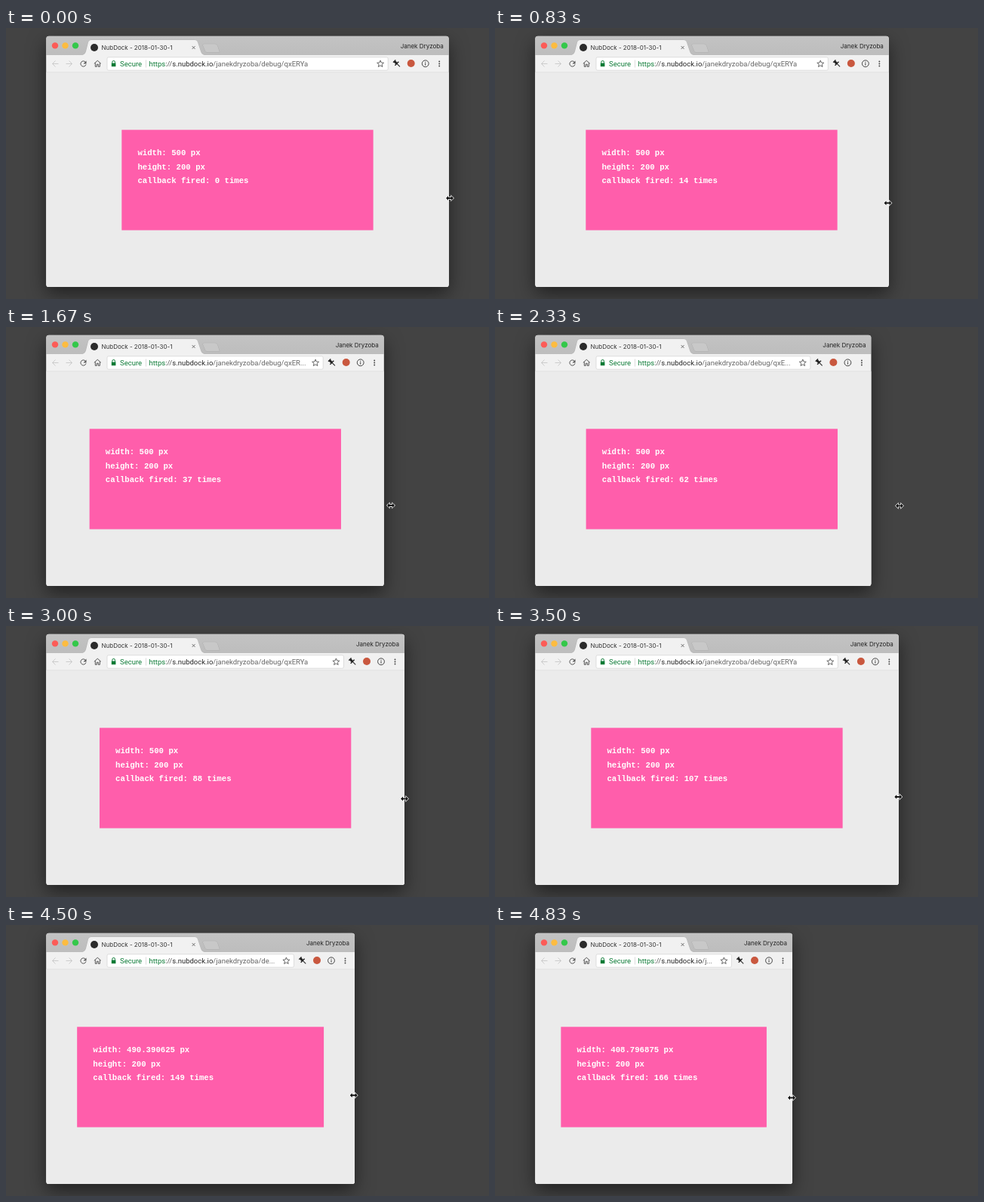
An HTML page with a canvas for the animation above (5000 ms loop, 640 px wide and 360 px high).

```html
<!DOCTYPE html>
<html lang="en">
<head>
<meta charset="utf-8">
<title>Resize observer demo</title>
<style>
html, body { margin: 0; width: 100%; height: 100%; overflow: hidden; background: #434343; }
canvas { display: block; width: 640px; height: 360px; }
</style>
</head>
<body>
<canvas id="stage"></canvas>
<script>
const LOOP = 5000, STEP_RATE = 6, LAST_STEP = 29;
const LEFT = 53.3, TOP = 10.7, BAR_BOTTOM = 36, PAGE_TOP = 59, BOTTOM = 344;
const SCALE = 2 / 3; // stage pixels per page pixel
const SHAKE = 14;    // sideways swing of the drag, in stage pixels
const URL_FONT = '9.5px Roboto, sans-serif';
const UI_FONT = '8px Inter, sans-serif';
const PAGE_FONT = 'bold 10.667px "Liberation Mono", monospace';
const GREEN = '#0b7a35';
const URL_RUNS = [
  ['https', GREEN],
  ['://', '#555'],
  ['s.nubdock.io', '#262626'],
  ['/janekdryzoba/debug/qxERYa', '#666']
];
const ADDRESS = URL_RUNS.map(run => run[0]).join('');

// Main poses of the drag: cursor, window edge, laid-out page width, callback count.
const POSES = [
  { step: 3, x: 588, y: 226, edge: 586.7, page: 800, count: 0 },
  { step: 7, x: 453, y: 239, edge: 457, page: 601, count: 27 },
  { step: 10, x: 510, y: 237, edge: 500.7, page: 672, count: 37 },
  { step: 14, x: 536, y: 237.5, edge: 498.4, page: 702, count: 62 },
  { step: 18, x: 528, y: 229.5, edge: 528, page: 712, count: 88 },
  { step: 25, x: 528.5, y: 223, edge: 530, page: 715, count: 132 },
  { step: 29, x: 393, y: 229.5, edge: 394, page: 511, count: 166 }
];

const canvas = document.getElementById('stage');
const ratio = window.devicePixelRatio || 1;
canvas.width = 640 * ratio;
canvas.height = 360 * ratio;
const ctx = canvas.getContext('2d');
ctx.scale(ratio, ratio);

function poseAt(step) {
  if (step <= POSES[0].step) return POSES[0];
  const next = POSES.findIndex(pose => pose.step >= step);
  const a = POSES[next - 1], b = POSES[next];
  const p = (step - a.step) / (b.step - a.step);
  const eased = p * p * (3 - 2 * p);
  const mix = (key, amount = eased) => a[key] + (b[key] - a[key]) * amount;
  const swing = SHAKE * Math.sin(2 * Math.PI * p);
  return {
    x: mix('x') + swing,
    y: mix('y'),
    edge: mix('edge') + swing,
    page: Math.round(mix('page') + swing / SCALE),
    count: Math.round(mix('count', p))
  };
}

function rect(x, y, w, h, color) {
  ctx.fillStyle = color;
  ctx.fillRect(x, y, w, h);
}

function circle(x, y, r, color) {
  ctx.fillStyle = color;
  ctx.beginPath();
  ctx.arc(x, y, r, 0, Math.PI * 2);
  ctx.fill();
}

function at(x, y, paint) {
  ctx.save();
  ctx.translate(x, y);
  paint();
  ctx.restore();
}

function trace(d, x, y, { fill, stroke, width = 1 }) {
  const path = new Path2D(d);
  at(x, y, () => {
    if (stroke) {
      ctx.strokeStyle = stroke;
      ctx.lineWidth = width;
      ctx.stroke(path);
    }
    if (fill) {
      ctx.fillStyle = fill;
      ctx.fill(path);
    }
  });
}

function text(str, x, y, font, color, align = 'left') {
  ctx.font = font;
  ctx.fillStyle = color;
  ctx.textAlign = align;
  ctx.fillText(str, x, y);
}

function roundRect(x, y, w, h, r) {
  ctx.beginPath();
  ctx.roundRect(x, y, w, h, r);
}

function drawTitleBar(edge) {
  const shade = ctx.createLinearGradient(0, TOP, 0, BAR_BOTTOM);
  shade.addColorStop(0, '#c3c3c3');
  shade.addColorStop(1, '#bdbdbd');
  rect(LEFT, TOP, edge - LEFT, BAR_BOTTOM - TOP, shade);
  ['#fc5b57', '#fdbc40', '#34c84a'].forEach((color, i) => circle(65 + i * 13.5, 23.4, 4.2, color));
  trace('M0 20Q4 19 5 15L8 3Q9 0 12 0H149Q152 0 153 3L157 15Q158 19 162 20Z',
    101, 16, { fill: '#f1f1f1', stroke: '#a9a9a9', width: 0.6 });
  trace('M1 0H16Q18 0 19 2L22 11H6Q4 11 3 9L0 2Q0 0 1 0Z',
    261, 21.3, { fill: '#c8c8c8', stroke: '#a2a2a2', width: 0.6 });
  circle(117, 26, 5, '#2b2b2b');
  text('NubDock - 2018-01-30-1', 126.5, 28.9, UI_FONT, '#333');
  trace('M-2 -2L2 2M2 -2L-2 2', 248.6, 26, { stroke: '#666', width: 0.9 });
  text('Janek Dryzoba', edge - 7, 26.5, UI_FONT, '#222', 'right');
}

function drawNavigation() {
  const dark = { stroke: '#555', width: 1 }, pale = { stroke: '#ccc', width: 1 };
  trace('M4 0H-4M0 -4L-4 0L0 4', 65.5, 47.5, pale);
  trace('M-4 0H4M0 -4L4 0L0 4', 83.5, 47.5, pale);
  trace('M3 -2A3.6 3.6 0 1 0 3.5 1', 102.5, 47.5, dark);
  trace('M4 -4V0H0Z', 102.5, 47.5, { fill: '#555' });
  trace('M-4.5 0L0 -4L4.5 0M-3 -1V4H-1V1H1V4H3V-1', 121.3, 47.3, dark);
}

function drawAddress(edge) {
  roundRect(134, 38.8, edge - 214.5, 17.4, 2);
  ctx.fillStyle = '#fff';
  ctx.fill();
  ctx.strokeStyle = '#d2d2d2';
  ctx.lineWidth = 0.7;
  ctx.stroke();
  rect(139.8, 46.6, 5.6, 4.6, GREEN);
  trace('M-1.8 0V-1.5A1.8 1.8 0 0 1 1.8 -1.5V0', 142.6, 46.8, { stroke: GREEN });
  text('Secure', 151, 50.9, URL_FONT, GREEN);
  rect(185, 42.5, 0.7, 10, '#ccc');

  const textLeft = 189.5, room = edge - 102 - textLeft;
  let shown = ADDRESS;
  for (let n = ADDRESS.length - 1; ctx.measureText(shown).width > room; n--) {
    shown = ADDRESS.slice(0, n) + '...';
  }
  let x = textLeft, start = 0;
  URL_RUNS.forEach(([run, color], i) => {
    const end = i === URL_RUNS.length - 1 ? shown.length : start + run.length;
    const part = shown.slice(start, end);
    text(part, x, 50.9, URL_FONT, color);
    x += ctx.measureText(part).width;
    start = end;
  });
}

function drawStar(x, y) {
  ctx.beginPath();
  for (let i = 0; i < 10; i++) {
    const r = i % 2 ? 2.1 : 4.7, angle = (i / 5 - 0.5) * Math.PI;
    ctx.lineTo(x + r * Math.cos(angle), y + r * Math.sin(angle));
  }
  ctx.closePath();
  ctx.strokeStyle = '#555';
  ctx.lineWidth = 0.9;
  ctx.stroke();
}

function drawPin(x, y) {
  at(x, y, () => {
    ctx.rotate(-Math.PI / 4);
    rect(-2.3, -5, 4.6, 1.4, '#222');
    rect(-1.5, -4, 3, 4, '#222');
    rect(-3.5, -0.5, 7, 1.4, '#222');
    rect(-0.5, 0, 1, 6, '#222');
  });
}

function drawTools(edge) {
  drawStar(edge - 90.6, 47.7);
  drawPin(edge - 69, 47.2);
  circle(edge - 50, 47, 5, '#c9583f');
  trace('M4.4 0A4.4 4.4 0 1 1 -4.4 0A4.4 4.4 0 1 1 4.4 0M0 -.8V2.4M0 -2.5V-1.5',
    edge - 31, 47.3, { stroke: '#444' });
  for (const dy of [-3, 0, 3]) circle(edge - 12.5, 47.5 + dy, 0.95, '#444');
}

function drawPage({ page, count, edge }) {
  const boxWidth = Math.min(500, Math.floor(page * 0.8 * 64) / 64);
  const x = LEFT + (page - boxWidth) / 2 * SCALE;
  rect(LEFT, PAGE_TOP, edge - LEFT, BOTTOM - PAGE_TOP, '#fff');
  rect(LEFT, PAGE_TOP, page * SCALE + 0.5, BOTTOM - PAGE_TOP, '#ebebeb');
  rect(x, 135.3, boxWidth * SCALE, 133.3, '#ff5eab');
  [`width: ${boxWidth} px`, 'height: 200 px', `callback fired: ${count} times`].forEach((line, i) =>
    text(line, x + 21.1, 169.2 + i * 18.6, PAGE_FONT, '#fff'));
}

function drawCursor({ x, y }) {
  trace('M-5 0L-2 -3V-1H2V-3L5 0L2 3V1H-2V3Z', x, y, { fill: '#111', stroke: '#fff', width: 1.3 });
}

function draw(step) {
  const pose = poseAt(step), { edge } = pose;
  const width = edge - LEFT;
  rect(0, 0, 640, 360, '#434343');

  ctx.save();
  ctx.shadowColor = 'rgba(0,0,0,.5)';
  ctx.shadowBlur = 24 * ratio;
  ctx.shadowOffsetY = 9 * ratio;
  roundRect(LEFT, TOP, width, BOTTOM - TOP, 3.5);
  ctx.fillStyle = '#ebebeb';
  ctx.fill();
  ctx.restore();

  ctx.save();
  roundRect(LEFT, TOP, width, BOTTOM - TOP, 3.5);
  ctx.clip();
  drawPage(pose);
  drawTitleBar(edge);
  rect(LEFT, BAR_BOTTOM, width, PAGE_TOP - BAR_BOTTOM, '#f1f1f1');
  rect(LEFT, PAGE_TOP - 0.5, width, 0.7, '#dcdcdc');
  drawNavigation();
  drawAddress(edge);
  drawTools(edge);
  ctx.restore();

  drawCursor(pose);
}

const startTime = performance.now();
function tick() {
  const time = (performance.now() - startTime) % LOOP;
  draw(Math.min(LAST_STEP, Math.floor((time + 4) * STEP_RATE / 1000)));
  requestAnimationFrame(tick);
}
tick();
</script>
</body>
</html>
```
